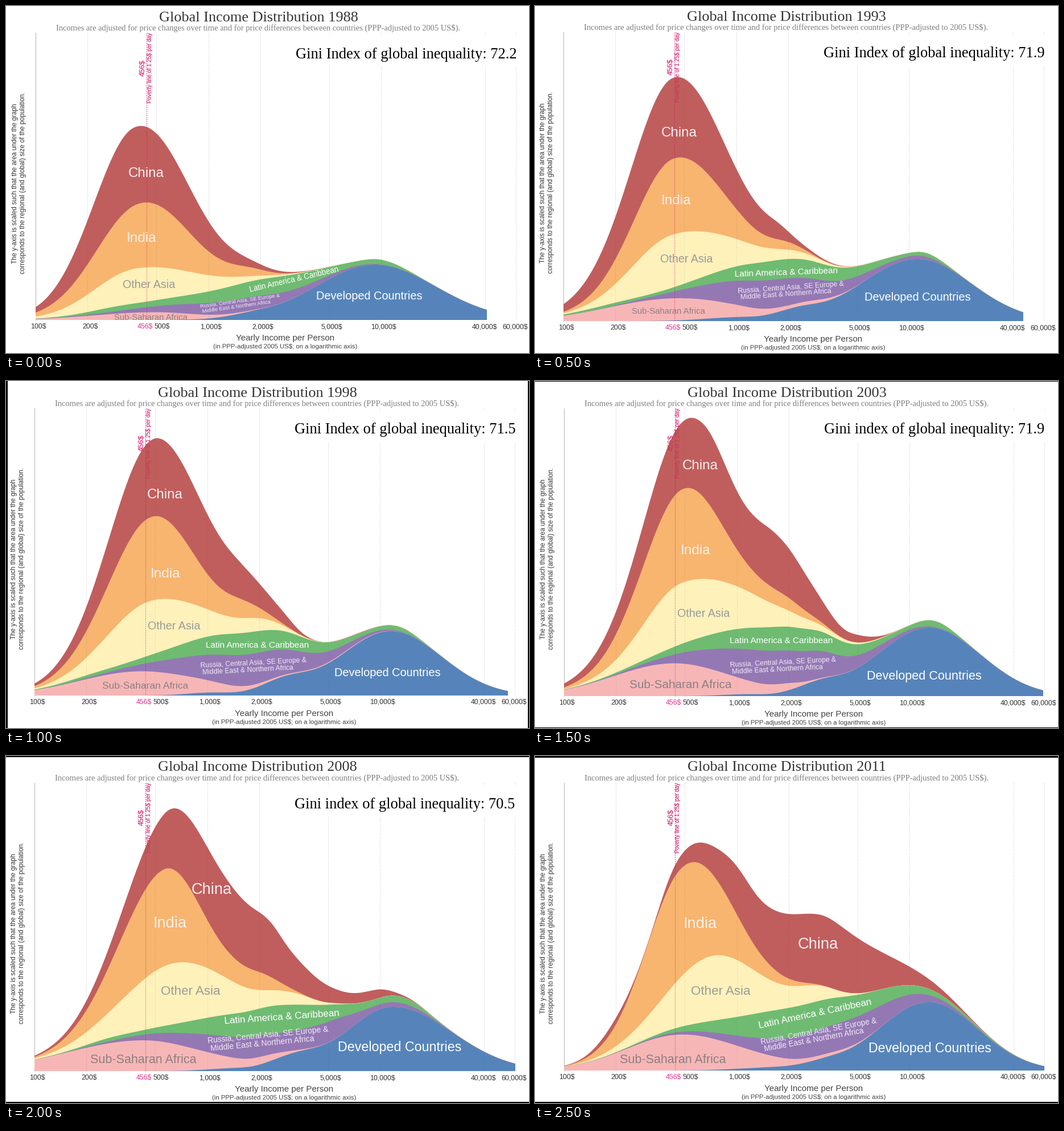
These frames come from a looping animation (919x609 px, 3000 ms). A matplotlib script:

```python
import numpy as np
import matplotlib.pyplot as plt
from matplotlib.animation import FuncAnimation

plt.rcParams["text.parse_math"] = False
W, H, DPI = 919, 609, 64
PT = 72 / DPI  # points per pixel
SANS, SERIF = "Liberation Sans", "Liberation Serif"
PINK = "#e8308c"
FILLS = ["#c05e5d", "#f7b56f", "#fef1ba", "#6fbb72", "#9478b4", "#f7b6b6", "#5684ba"]
NAMES = ["China", "India", "Other Asia", "Latin America & Caribbean",
         "Russia, Central Asia, SE Europe &\n Middle East & Northern Africa",
         "Sub-Saharan Africa", "Developed Countries"]
INKS = ["#f7f0f0", "#f7f0ea", "#9b9b9b", "#ffffff", "#f0e8f6", "#8c8083", "#ffffff"]
INCOMES = [100, 200, 500, 1000, 2000, 5000, 10000, 40000, 60000]
NUDGE = {500: 10, 40000: -1, 60000: -1}

scenes = []


def add(year, gini, left, end, base, lift, bars, spots, sizes, tilt, *layers):
    """Layers run top to bottom, each a chain of (height, centre, left, right) bells."""
    scenes.append(dict(year=year, gini=gini, left=left, end=end, base=base, lift=lift,
                       bars=bars, spots=spots, sizes=sizes, tilt=tilt, layers=layers))


# bars: black edge widths left, right, top, bottom
# sizes: scale of the first three labels, then the other four
add(1988, "Index of global inequality: 72.2", 52, 845, 551, 0, (0, 0, 0, 0),
    [(246.5, 291), (238, 405), (251.5, 488), (507, 479), (412, 522), (254, 545.5), (638.5, 508)],
    (1, 13.5, 9.15, 14.9, 20), (13, 8),
    (137, 222, 104, 137),
    (114, 244, 115, 110, 9, 425, 50, 45),
    (61, 230, 105, 145),
    (29, 470, 190, 118, 5, 190, 70, 70, 6, 660, 40, 50),
    (23.5, 420, 175, 130),
    (13.5, 262, 150, 110),
    (97, 648, 146, 151, 5, 435, 60, 50))

add(1993, "Index of global inequality: 71.9", 50, 858, 553, -1.5, (0, 0, 0, 0),
    [(253.5, 220), (248.5, 339.5), (266.5, 443), (442, 466), (450, 500), (234, 535), (672, 510)],
    (1, 15.3, 12.1, 14.9, 20), (2, 4),
    (142, 242, 125, 132, 10, 420, 45, 30),
    (133, 246, 99, 112, 8, 440, 40, 40),
    (93, 240, 97, 140, 6, 460, 50, 60),
    (34, 440, 158, 155, 4, 130, 100, 70, 4, 690, 30, 40),
    (50, 412, 140, 145, 4, 680, 40, 40),
    (39, 242, 161, 145, 4, 495, 40, 45),
    (109, 672, 140, 133, 14, 460, 60, 55, 6, 350, 80, 50))

add(1998, "Index of global inequality: 71.5", 50, 882, 552, 0.5, (3, 2, 0, 0),
    [(279.5, 197), (279.5, 336), (295, 429), (441.5, 462), (435, 501), (244.5, 534), (670, 511)],
    (1, 15.3, 12.1, 17.4, 20), (0, 3),
    (137, 270, 119, 162, -8, 525, 30, 55),
    (147, 258, 109, 100, 20, 415, 45, 50),
    (95, 250, 103, 125, 14, 445, 50, 50),
    (38.5, 425, 165, 150, 3, 140, 70, 60, 6, 690, 45, 35),
    (55, 425, 153, 138),
    (42.5, 238, 154, 142, 1.5, 580, 80, 80),
    (113, 676, 125, 126, 22, 490, 60, 60, 5, 360, 60, 50))

add(2003, "index of global inequality: 71.9", 51, 893, 553, 0.5, (0, 0, 1, 1),
    [(290.5, 146), (281.5, 295), (296, 407), (432.5, 454), (436, 500), (256, 532), (684, 516)],
    (1, 15.3, 12.1, 20.6, 21.6), (0, 3),
    (126, 296, 143, 80, 88, 425, 67, 88, 7, 570, 25, 35),
    (164, 262, 105, 92, 20, 435, 70, 60),
    (107, 258, 93, 163),
    (42, 434, 178, 150, 9, 700, 40, 40),
    (59, 415, 147, 153, 5, 500, 35, 35),
    (57.5, 245, 152, 137, 6, 440, 40, 30),
    (120, 693, 130, 127, 16, 500, 60, 50, 3, 370, 60, 40))

add(2008, "index of global inequality: 70.5", 50, 895, 553, -0.5, (0, 0, 2, 2),
    [(361, 232), (288, 291), (324.5, 411), (485, 457), (461, 497), (241, 531), (691.5, 510)],
    (1.13, 17, 13.9, 21.5, 23.2), (4, 5.5),
    (128, 358, 152, 172, 9, 465, 30, 25, 9, 650, 40, 30),
    (170, 278, 112, 86, 28, 440, 70, 50),
    (107, 296, 124, 128, 14, 500, 55, 50),
    (49, 470, 162, 137, 4, 180, 60, 60, 8, 700, 50, 45),
    (37, 420, 155, 110, 30, 570, 75, 60, 7, 690, 50, 60),
    (54, 242, 192, 148, 6, 460, 40, 40),
    (113, 680, 115, 146, 21, 505, 65, 60, 4, 390, 60, 40))

add(2011, "", 51, 895, 552, -0.5, (0, 0, 3, 2),
    [(497.5, 328), (290, 292), (326, 411), (493, 451), (500, 490), (242, 531.5), (694, 512)],
    (1.13, 17, 13.5, 21.5, 23.1), (12, 10.5),
    (123, 500, 190, 137, 16, 355, 35, 35, -9, 205, 40, 30, 9, 135, 40, 40),
    (190, 255, 89, 107, 5, 430, 40, 50),
    (114, 314, 112, 112, 20, 490, 55, 50),
    (53, 460, 152, 185),
    (48, 545, 190, 126),
    (63, 258, 137, 146, 3, 530, 50, 50),
    (120, 692, 125, 122, 9, 505, 70, 50, 4, 400, 80, 50))


def thickness(x, bells):
    total = np.zeros_like(x)
    for h, c, rise, fall in zip(*(bells[i::4] for i in range(4))):
        total += h * np.exp(-((x - c) / np.where(x < c, rise, fall)) ** 2)
    return np.maximum(total, 0)


fig = plt.figure(figsize=(W / DPI, H / DPI), dpi=DPI, facecolor="white")
ax = fig.add_axes([0, 0, 1, 1])


def write(x, y, text, size, color, font=SANS, ha="center", angle=0, **kw):
    kw.setdefault("va", "baseline")
    return ax.text(x, y, text, fontsize=size * PT, color=color, family=font, ha=ha,
                   rotation=angle, rotation_mode="anchor", **kw)


def rule(x, top, base, color, **kw):
    return ax.plot([x, x], [top, base], color=color, lw=PT, **kw)[0]


def box(x, y, w, h, color, z):
    ax.add_patch(plt.Rectangle((x, y), w, h, fc=color, ec="none", zorder=z))


def poverty(left, base, lift, color, **kw):
    return [rule(left + 194.5, 47 + lift, base, color, ls=(0, (2, 1.5)), **kw),
            write(left + 191.5, 108.5 + lift, "456$", 13, color, angle=90, **kw),
            write(left + 203.5, 108.5 + lift, "Poverty line of 1.25$ per day", 9.8, color,
                  angle=90, **kw)]


def draw_areas(s):
    base = s["base"]
    x = np.arange(s["left"], s["end"] + 1.0, 2)
    x[-1] = s["end"]
    stack = np.cumsum([thickness(x, bells) for bells in s["layers"][::-1]], axis=0)[::-1]
    return [ax.fill(np.r_[x, x[-1], x[0]], np.r_[base - top, base, base], fc=color,
                    ec="none", zorder=2)[0] for top, color in zip(stack, FILLS)]


def draw_axes(s, shape):
    left, base, lift = s["left"], s["base"], s["lift"]
    # lines and notes stay faintly visible through the areas
    veiled = poverty(left, base, lift, "#c0104a", alpha=0.5, zorder=2.5, clip_on=True)
    poverty(left, base, lift, PINK, zorder=1)
    dots = dict(ls=(0, (2, 2)))
    for value in INCOMES:
        x = left + 843.5 * np.log10(value / 100) / np.log10(600)
        if value > 100:
            rule(x, 47 + lift, base, "#d6d6d6", zorder=1, **dots)
            veiled.append(rule(x, 47 + lift, base, "#444444", alpha=0.13, zorder=2.5, **dots))
        write(x + NUDGE.get(value, 4.5), base + 15, f"{value:,}$", 12.4, "#333333")
    for item in veiled:
        item.set_clip_path(shape)
    rule(left, 47 + lift, base, "#b4b4b4", zorder=1)
    write(left + 192, base + 15, "456$", 12.4, PINK)
    write(left + 438.5, base + 36, "Yearly Income per Person", 15.1, "#444444")
    write(left + 438.5, base + 50, "(in PPP-adjusted 2005 US$; on a logarithmic axis)", 11.4,
          "#444444")
    write(left - 33, 312 + lift, "The y-axis is scaled such that the area under the graph",
          11.5, "#333333", angle=90)
    write(left - 19, 310.5 + lift, "corresponds to the regional (and global) size of the "
          "population.", 11.5, "#333333", angle=90)


def draw_titles(s):
    left, lift = s["left"], s["lift"]
    if s["gini"]:
        box(left + 450, 52 + lift, 405, 55, "white", 1.5)
        write(left + 457, 92 + lift, "Gini " + s["gini"], 26.5, "black", SERIF, "left")
    write(left + 392, 27 + lift, f"Global Income Distribution {s['year']}", 26.2,
          "#333333", SERIF)
    write(left + 391, 43.3 + lift, "Incomes are adjusted for price changes over time and for "
          "price differences between countries (PPP-adjusted to 2005 US$).", 14.53,
          "#7d7d7d", SERIF)


def draw_labels(s):
    scale, *small = s["sizes"]
    sizes = [24.1 * scale, 24.2 * scale, 19.8 * scale, *small]
    angles = [0, 0, 0, *s["tilt"], 0, 0]
    for name, ink, (x, y), size, angle in zip(NAMES, INKS, s["spots"], sizes, angles):
        if "\n" in name:
            write(x, y, name, size, ink, angle=angle, va="center", linespacing=0.95,
                  multialignment="left")
        else:
            write(x, y + 0.36 * size, name, size, ink, angle=angle)


def draw(n):
    s = scenes[n]
    ax.clear()
    ax.set(xlim=(0, W), ylim=(H, 0))
    ax.axis("off")
    areas = draw_areas(s)
    draw_axes(s, areas[0])
    draw_titles(s)
    draw_labels(s)
    west, east, north, south = s["bars"]
    for edge in [(0, 0, west, H), (W - east, 0, east, H),
                 (0, 0, W, north), (0, H - south, W, south)]:
        box(*edge, "black", 5)
    return []


anim = FuncAnimation(fig, draw, frames=len(scenes), init_func=lambda: draw(0),
                     interval=500, repeat=True, repeat_delay=0, blit=False)
plt.show()
```
